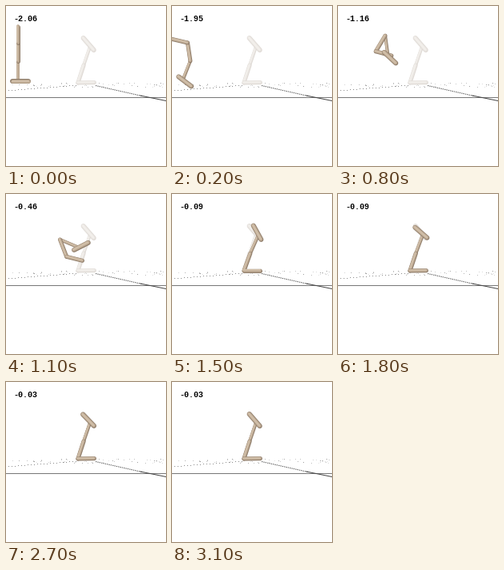
A matplotlib script for the animation above (8100 ms loop, 200x200 px).

```python
import numpy as np
import matplotlib.pyplot as plt
from matplotlib.animation import FuncAnimation

SIZE, DPI = 200, 100
PT = 72 / DPI            # points per pixel
STEP, LOOP = 100, 8100
SCALE = 51               # pixels per metre of the hopper
REST = 31                # step at which everything stands still

# Stand, crouch, leap, tuck and land: the key poses of the backflip.
FLIP = np.array([0, 4, 8, 11, 15])
TORSO = [90, 270, 345, 346, 360]
THIGH = [270, 299, 419, 471, 430]
SHIN = [270, 227, 278, 337, 426]
FOOT = [360, 286, 317, 387, 479]
SCORE = [-2.06, -1.73, -1.16, -0.46, -0.09]

BODY = ["#8f7d6b", "#bda992", "#d0bea8"]
GHOST = ["#dfdad5", "#ebe7e3", "#f2efeb"]
WIDTHS = [4, 5, 5, 6]                            # shin, thigh, torso, foot
LAYERS = [(1, 0), (0.75, -0.35), (0.4, -0.6)]    # relative width, shift to light


def ease(t, start, end):
    u = np.clip((t - start) / (end - start), 0, 1)
    return u * u * (3 - 2 * u)


def curve(t, values):
    """Smooth path through the key poses without overshoot."""
    t = min(t, FLIP[-1])
    h = np.diff(FLIP)
    d = np.diff(values) / h
    m = np.zeros(len(FLIP))
    a, b = d[:-1], d[1:]
    same = a * b > 0
    m[1:-1][same] = 2 * a[same] * b[same] / (a + b)[same]
    k = min(np.searchsorted(FLIP, t, side="right"), len(h)) - 1
    u = (t - FLIP[k]) / h[k]
    w = u * u * (3 - 2 * u)
    return (values[k] + w * (values[k + 1] - values[k])
            + h[k] * u * (1 - u) * ((1 - u) * m[k] - u * m[k + 1]))


def hip_at(t):
    x = 15 + 9 * ease(t, 0, 4) + 66 * ease(t, 4, 14)
    y = 46 + 50 * ease(t, 5, 15)
    return np.array([x, y])


def angles_at(t):
    settle = ease(t, 15, 20)
    tap = 50 * np.sin(np.pi * np.clip((t - 16) / 12, 0, 1)) ** 2
    return (curve(t, TORSO) + settle,
            curve(t, THIGH) + 2 * settle,
            curve(t, SHIN) + 5 * settle,
            curve(t, FOOT) + 12 * settle + tap)


def score_at(t):
    return curve(t, SCORE) + 0.06 * ease(t, 22, 28)


def ray(deg, metres):
    a = np.radians(deg)
    return SCALE * metres * np.array([np.cos(a), -np.sin(a)])


def limbs(t):
    """End points of shin, thigh, torso and foot."""
    torso, thigh, shin, foot = angles_at(t)
    hip = hip_at(t)
    knee = hip + ray(thigh, 0.45)
    ankle = knee + ray(shin, 0.5)
    return [(knee, ankle), (hip, knee), (hip, hip + ray(torso, 0.4)),
            (ankle - ray(foot, 0.13), ankle + ray(foot, 0.26))]


class Hopper:
    def __init__(self, ax, colors, z):
        self.lines = [
            [ax.plot([], [], color=c, lw=w * rel * PT, zorder=z + i,
                     solid_capstyle="round")[0]
             for c, (rel, _) in zip(colors, LAYERS)]
            for i, w in enumerate(WIDTHS)]

    def pose(self, t):
        for (p, q), group in zip(limbs(t), self.lines):
            for line, (_, shift) in zip(group, LAYERS):
                line.set_data([p[0] + shift, q[0] + shift],
                              [p[1] + shift, q[1] + shift])


def dots(ax, x, y, color):
    ax.scatter(np.floor(x) + 0.5, np.floor(y) + 0.5, s=PT ** 2, marker="s",
               lw=0, c=color, zorder=1)


def draw_ground(ax):
    rng = np.random.default_rng(4)
    n = 60
    dots(ax, rng.uniform(0, SIZE, n), rng.uniform(96, 102, n),
         [str(g) for g in rng.uniform(0.6, 0.9, n)])
    x = np.arange(2, 88, 4)
    dots(ax, x, 105 - 7 * x / 88, "#8c8c8c")
    ax.plot([0, SIZE], [113.5, 113.5], color="#777777", lw=PT, zorder=1)
    ax.plot([112, 170], [99.5, 112.5], color="#555555", lw=PT,
            ls=(0, (1.4, 1)), zorder=1)
    ax.plot([168, SIZE], [112, 118.5], color="#444444", lw=PT, zorder=1)


fig = plt.figure(figsize=(SIZE / DPI, SIZE / DPI), dpi=DPI, facecolor="white")
ax = fig.add_axes([0, 0, 1, 1])
ax.set_xlim(0, SIZE)
ax.set_ylim(SIZE, 0)
ax.axis("off")

draw_ground(ax)
Hopper(ax, GHOST, 2).pose(REST)
hopper = Hopper(ax, BODY, 10)
label = ax.text(9.5, 19, "", family="Liberation Mono", weight="bold",
                size=10 * PT, color="black", va="baseline")


def update(i):
    t = min(i, REST)
    hopper.pose(t)
    label.set_text(f"{score_at(t):.2f}")


anim = FuncAnimation(fig, update, frames=LOOP // STEP, interval=STEP,
                     repeat=True, repeat_delay=0)
plt.show()
```
